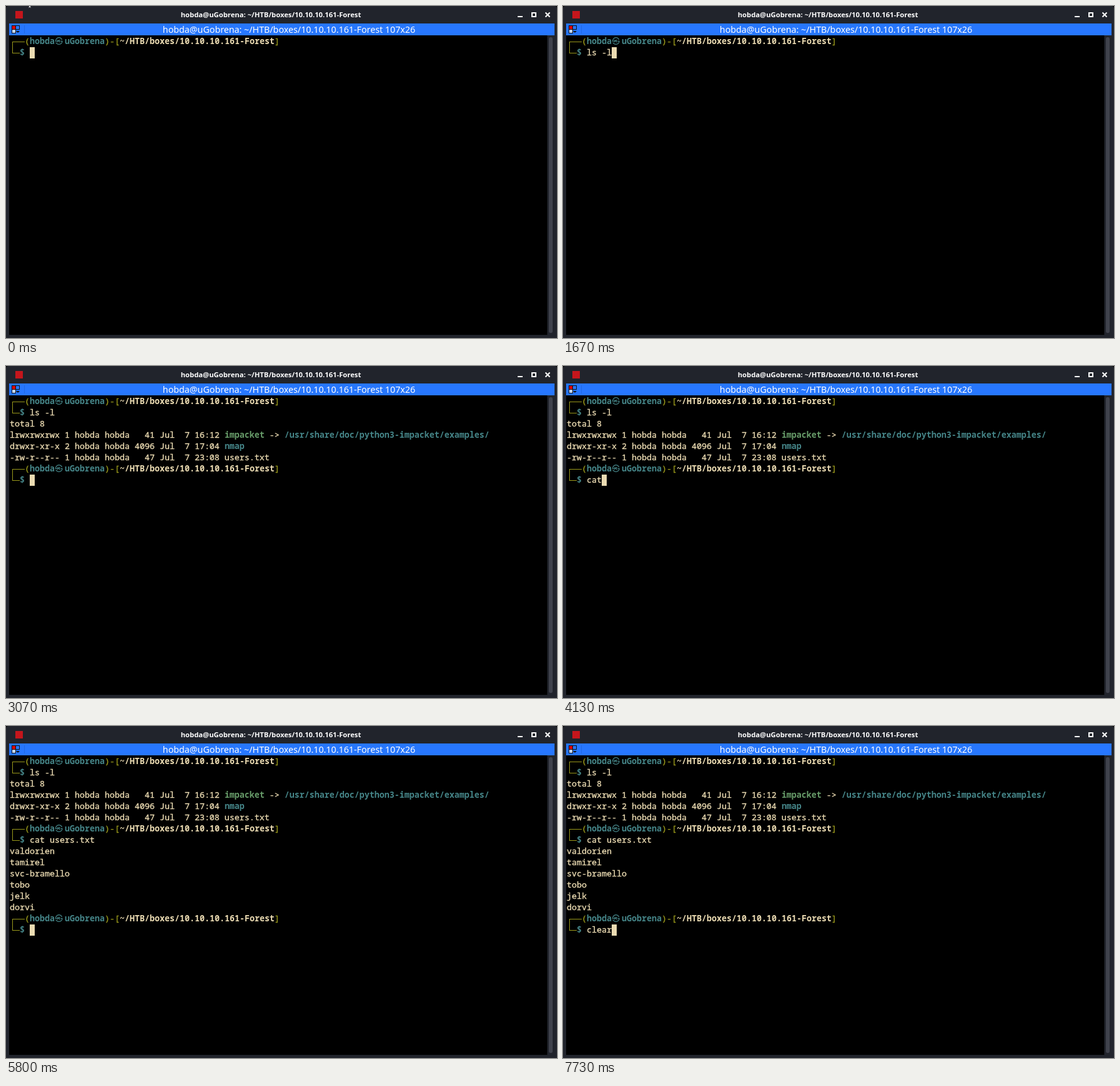
Write an HTML page that moves like this. It is 882 by 532 pixels and loops after 8 s.

```html
<!DOCTYPE html>
<html lang="en">
<head>
<meta charset="utf-8">
<title>Terminal</title>
<style>
  :root { --fg: #ebdbb2; --blue: #458588; --green: #98971a; --aqua: #689d6a; --frame: #21242c; }
  html, body { margin: 0; width: 100%; height: 100%; overflow: hidden; background: #000; }
  #win { position: absolute; left: 0; top: 0; width: 882px; height: 532px; overflow: hidden; background: var(--frame); border-radius: 4px 4px 0 0; }
  #win > * { position: absolute; }
  svg { left: 0; top: 0; }

  .title { left: 0; top: 6px; width: 848px; text-align: center; white-space: pre; color: #fff; font: bold 11.25px/15px "Open Sans", "Noto Sans", sans-serif; }
  .bar { left: 5px; top: 28px; width: 873px; height: 19px; background: #2777ff; }
  .tab { left: 0; top: 28px; width: 906px; text-align: center; white-space: pre; color: #fff; font: 14.25px/19px "Noto Sans", "Open Sans", sans-serif; }
  .screen { left: 5px; top: 47px; width: 861px; height: 480px; background: #000; border-right: 1px solid #15171c; }
  .thumb { left: 869px; top: 50px; width: 6px; height: 474px; border-radius: 3px; background: #40434d; }

  #term { left: 6px; top: 47px; color: var(--fg); font: 13.3333px/18px "Noto Sans Mono", "DejaVu Sans Mono", monospace; font-variant-ligatures: none; -webkit-text-stroke: 0.35px currentColor; }
  #term b { -webkit-text-stroke-width: 0; }
  .l, .p, .cmd { height: 18px; white-space: pre; position: relative; }
  .dir { color: var(--blue); }
  .link { color: var(--aqua); }

  /* two-line prompt with its corner lines */
  .p { padding-left: 24px; color: var(--green); }
  .p b { color: var(--blue); }
  .p b.path { color: var(--fg); }
  .p::before, .p::after { content: ""; position: absolute; left: 4px; top: 10px; box-sizing: border-box; border: 0 solid var(--green); }
  .p::before { width: 12px; height: 19px; border-left-width: 1px; border-bottom-width: 1px; }
  .p::after { width: 20px; height: 1px; border-top-width: 1px; }
  .sym { display: inline-block; width: 16px; height: 18px; vertical-align: top; text-indent: 0.5px; font: bold 12.5px/18px "Noto Sans CJK KR", "Noto Sans CJK JP", "Noto Sans CJK SC", sans-serif; }

  .cmd { display: flex; padding-left: 16px; }
  .cmd b { color: var(--blue); margin-right: 8px; }
  .cmd span { width: 0; overflow: hidden; }
  .cmd i { position: relative; top: 1px; width: 8px; height: 18px; background: var(--fg); }

  .type1, .type2, .type3, .cur1, .cur2, .cur3, .out1, .out2, .tip { animation: 8s step-end infinite; }
  .type1 { animation-name: type1; }
  .type2 { animation-name: type2; }
  .type3 { animation-name: type3; }
  .cur1 { animation-name: cur1; }
  .cur2 { animation-name: cur2; }
  .cur3 { animation-name: cur3; }
  .out1 { animation-name: out1; }
  .out2 { animation-name: out2; }
  .tip { animation-name: tip; }

  @keyframes type1 {
    0% { width: 0 } 15% { width: 8px } 16.625% { width: 16px } 18.375% { width: 24px }
    20% { width: 32px } 20.875%, 100% { width: 40px }
  }
  @keyframes type2 {
    0% { width: 0 } 45.875% { width: 8px } 48.375% { width: 16px } 51.625% { width: 24px }
    55% { width: 32px } 59.125% { width: 40px } 60% { width: 48px } 61.625% { width: 56px }
    65%, 100% { width: 112px }
  }
  @keyframes type3 {
    0% { width: 0 } 87.5% { width: 8px } 90.875% { width: 16px } 93.375% { width: 24px }
    94.125% { width: 32px } 96.625%, 100% { width: 40px }
  }
  @keyframes cur1 { 0% { opacity: 1 } 24.125%, 100% { opacity: 0 } }
  @keyframes cur2 { 0% { opacity: 1 } 30.875% { opacity: 0 } 38.375% { opacity: 1 } 72.5%, 100% { opacity: 0 } }
  @keyframes cur3 { 0% { opacity: 1 } 79.125% { opacity: 0 } 86.625%, 100% { opacity: 1 } }
  @keyframes out1 { 0% { opacity: 0 } 24.125%, 100% { opacity: 1 } }
  @keyframes out2 { 0% { opacity: 0 } 72.5%, 100% { opacity: 1 } }
  @keyframes tip { 0% { opacity: 1 } 14.125%, 100% { opacity: 0 } }
</style>
</head>
<body>
<div id="win">
  <div class="title">hobda@uGobrena: ~/HTB/boxes/10.10.10.161-Forest</div>
  <div class="bar"></div>
  <div class="tab">hobda@uGobrena: ~/HTB/boxes/10.10.10.161-Forest 107x26</div>
  <div class="screen"></div>
  <div class="thumb"></div>

  <svg width="882" height="532" viewBox="0 0 882 532">
    <rect x="15" y="8" width="12" height="12" fill="#c4161c"/>
    <g fill="none" stroke="#fff" stroke-width="2">
      <path d="M819 17h8M863.5 10.5l7 7m0-7l-7 7"/>
      <rect x="842" y="11" width="6" height="6"/>
    </g>
    <rect x="9" y="31" width="7" height="7" fill="#111"/>
    <rect x="10" y="32" width="5" height="5" fill="#e00000"/>
    <path d="M16 31h6v7h-6zM9 38h7v6h-7z" fill="#111"/>
    <rect x="16" y="32" width="5" height="5" fill="#2777ff"/>
    <rect x="10" y="38" width="5" height="5" fill="#c3d4f5"/>
    <path d="M16 40h6l-3 3z" fill="#111"/>
    <path d="M29.5 31v13" stroke="#2169e2"/>
    <path class="tip" d="M36.5 0l1.5 1.2 1.5-1.2M36.5 2.6l1.5-1.4 1.5 1.4" fill="none" stroke="#fff"/>
  </svg>

  <div id="term">
    <div class="p"></div>
    <div class="cmd"><b>$</b><span class="type1">ls -l</span><i class="cur1"></i></div>
    <div class="out1">
      <div class="l">total 8</div>
      <div class="l">lrwxrwxrwx 1 hobda hobda   41 Jul  7 16:12 <b class="link">impacket</b> -&gt; <b class="dir">/usr/share/doc/python3-impacket/examples/</b></div>
      <div class="l">drwxr-xr-x 2 hobda hobda 4096 Jul  7 17:04 <b class="dir">nmap</b></div>
      <div class="l">-rw-r--r-- 1 hobda hobda   47 Jul  7 23:08 users.txt</div>
      <div class="p"></div>
      <div class="cmd"><b>$</b><span class="type2">cat users.txt </span><i class="cur2"></i></div>
    </div>
    <div class="out2">
      <div class="l">valdorien</div>
      <div class="l">tamirel</div>
      <div class="l">svc-bramello</div>
      <div class="l">tobo</div>
      <div class="l">jelk</div>
      <div class="l">dorvi</div>
      <div class="p"></div>
      <div class="cmd"><b>$</b><span class="type3">clear</span><i class="cur3"></i></div>
    </div>
  </div>
</div>
<script>
  const prompt = '(<b>hobda<span class="sym">㉿</span>uGobrena</b>)-[<b class="path">~/HTB/boxes/10.10.10.161-Forest</b>]';
  document.querySelectorAll('.p').forEach(line => { line.innerHTML = prompt; });
</script>
</body>
</html>
```
